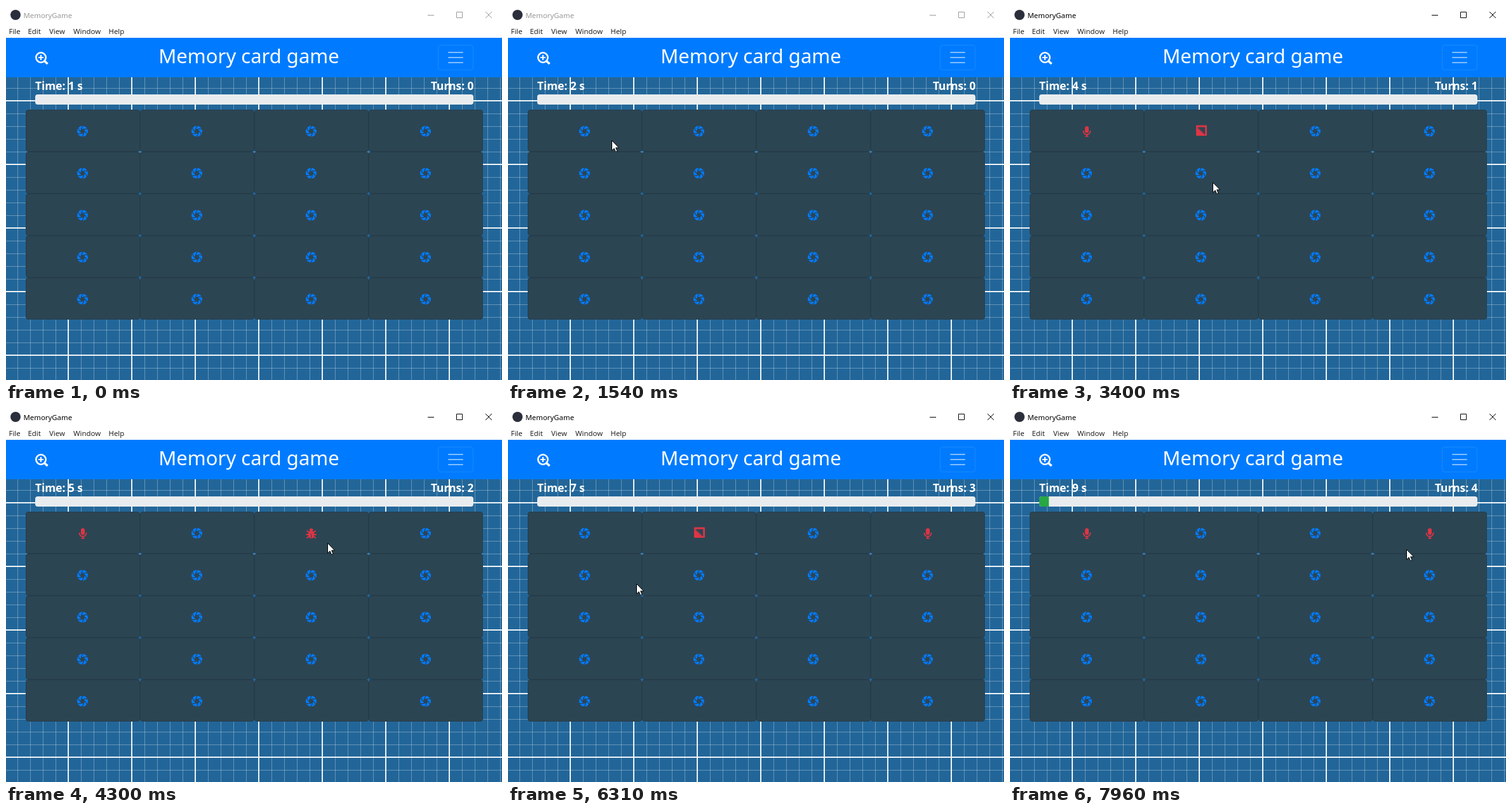
These frames come from a looping animation (781 px wide and 588 px high, 7.99 s). An HTML page:

```html
<!DOCTYPE html>
<html lang="en">
<head>
<meta charset="utf-8">
<title>Memory card game</title>
<style>
  html, body { margin: 0; width: 100%; height: 100%; overflow: hidden; }
  svg { display: block; width: 781px; height: 588px; }
  text { font-family: "Noto Sans", "Open Sans", sans-serif; white-space: pre; }
  .small { font-size: 11.4px; }
  .menu { fill: #222; }
  .title { font-size: 31px; font-weight: 500; fill: #fff; text-anchor: middle; }
  .status { font-size: 17.3px; font-weight: 700; fill: #fff; }
  .card { fill: #2c4553; stroke: #263d49; }
  .front { fill: #dc3545; stroke: none; }
  .hidden { display: none; }
  #chrome { color: #999; }
  #chrome.active { color: #000; }
</style>
</head>
<body>
<svg viewBox="0 0 781 588">
  <defs>
    <pattern id="minor" width="20" height="20" patternUnits="userSpaceOnUse" x="-2" y="49">
      <path d="M0 .5H20M.5 0V20" stroke="#fff" stroke-opacity=".3"/>
    </pattern>
    <pattern id="major" width="100" height="100" patternUnits="userSpaceOnUse" x="-3" y="48">
      <path d="M0 1H100M1 0V100" stroke="#fff" stroke-width="2" stroke-opacity=".9"/>
    </pattern>
    <clipPath id="barShape"><rect x="46" y="139" width="690" height="16" rx="4"/></clipPath>

    <g id="aperture">
      <circle r="8.5" fill="#007bff"/>
      <g id="blades" fill="none" stroke="#2c4553" stroke-width="1.3"></g>
    </g>
    <g id="mic">
      <rect x="-2.5" y="-8" width="6" height="10.5" rx="3"/>
      <path d="M-5 -1C-5 7 6 7 6 -1M.5 5V8.5" fill="none" stroke="#dc3545" stroke-width="1.9"/>
      <path d="M-2 7H3V8.6H-2Z"/>
    </g>
    <g id="picture">
      <rect x="-7.5" y="-9.5" width="17" height="16.5" rx="1"/>
      <path d="M-4 -6.5H6.7V3.8Z" fill="#2c4553"/>
      <path d="M-5 -6L6.5 4.5" stroke="#2c4553" stroke-width="1.2"/>
    </g>
    <g id="bug">
      <path d="M-3 -5.5A3.4 3.4 0 0 1 3.4 -5.5L2.5 -4H-2.1Z"/>
      <ellipse cx=".2" cy="2" rx="4.8" ry="6.3"/>
      <path d="M-7 -4L-3 -1.5M7.4 -4L3.4 -1.5M-8 2H8.4M-7 7.5L-3 4.5M7.4 7.5L3.4 4.5" stroke="#dc3545" stroke-width="2"/>
      <path d="M.2 1V8.5" stroke="#2c4553"/>
    </g>
  </defs>

  <rect width="781" height="50" fill="#fff"/>
  <circle cx="15" cy="14" r="8" fill="#2b2e3b"/>
  <g id="chrome">
    <text class="small" x="27.5" y="19" fill="currentColor">MemoryGame</text>
    <path d="M664 14.5H674M709.5 9.5H718.5V18.5H709.5ZM755 9L765 19M765 9L755 19" fill="none" stroke="currentColor"/>
  </g>
  <g class="small menu">
    <text x="4.5" y="44">File</text><text x="34.5" y="44">Edit</text>
    <text x="68" y="44">View</text><text x="106" y="44">Window</text>
    <text x="161.5" y="44">Help</text>
  </g>

  <rect y="50" width="781" height="538" fill="#226699"/>
  <rect y="50" width="781" height="538" fill="url(#minor)"/>
  <rect y="50" width="781" height="538" fill="url(#major)"/>
  <rect y="50" width="781" height="62" fill="#007bff"/>

  <g fill="none" stroke="#fff">
    <circle cx="55" cy="81" r="7.7" stroke-width="2.6"/>
    <path d="M55 77V85M51 81H59" stroke-width="2"/>
    <path d="M60.5 86.5L65.5 91" stroke-width="3.6"/>
    <rect x="680.5" y="61.5" width="55" height="39" rx="4" stroke-opacity=".1"/>
    <path d="M697 73H719M697 81H719M697 89H719" stroke-width="2" stroke-opacity=".5" stroke-linecap="round"/>
  </g>
  <text class="title" x="382.5" y="90">Memory card game</text>

  <text class="status" id="time" x="46" y="132"></text>
  <text class="status" id="turns" x="736.5" y="132" text-anchor="end"></text>
  <g clip-path="url(#barShape)">
    <rect x="46" y="139" width="690" height="16" fill="#e9ecef"/>
    <rect id="bar" x="46" y="139" width="0" height="16" fill="#28a745"/>
  </g>
  <g id="cards"></g>
  <path id="cursor" d="M.5 .5V16.2L4.1 12.8L6.6 18.4L9.1 17.3L6.7 11.9H11.6Z" fill="#fff" stroke="#000"/>
</svg>
<script>
const LOOP = 7990;
const $ = id => document.getElementById(id);

// [ms, x, y] of the pointer tip
const path = [
  [320, 732, 586], [910, 640, 493], [1060, 640, 493], [1540, 163, 211],
  [1770, 155, 212], [2120, 155, 212], [2560, 313, 212], [2660, 314, 213],
  [2890, 324, 273], [3010, 324, 273], [3400, 319, 277], [3440, 318, 276],
  [3720, 154, 211], [3830, 154, 211], [4300, 506, 212], [4610, 560, 263],
  [4720, 560, 263], [5380, 602, 215], [5520, 600, 216], [5660, 578, 234],
  [6070, 318, 222], [6130, 306, 225], [6310, 202, 276], [6450, 200, 279],
  [6670, 200, 279], [6900, 197, 283], [7330, 156, 212], [7490, 156, 212],
  [7840, 618, 215], [7960, 624, 222]
];

// [card, picture, shown from, shown until]
const reveals = [
  [0, "mic", 1740, 3500], [1, "picture", 2600, 3500],
  [0, "mic", 3750, 5170], [2, "bug", 4270, 5170],
  [3, "mic", 5430, 7030], [1, "picture", 6120, 7030],
  [0, "mic", 7400, LOOP], [3, "mic", 7860, LOOP]
];
const turnTimes = [2600, 4270, 6120, 7860];
const FOCUS = 1740, MATCH = 7860;

function hexagon() {
  const point = k => [4.2 * Math.cos(k * Math.PI / 3), 4.2 * Math.sin(k * Math.PI / 3)];
  let hole = "", cuts = "";
  for (let k = 0; k < 6; k++) {
    const [x, y] = point(k), [px, py] = point(k - 1);
    hole += `${k ? "L" : "M"}${x} ${y}`;
    cuts += `M${x} ${y}l${(x - px) * 1.6} ${(y - py) * 1.6}`;
  }
  return `<path d="${hole}Z" fill="#2c4553" stroke="none"/><path d="${cuts}"/>`;
}
$("blades").innerHTML = hexagon();

const iconAt = (name, i, extra = "") =>
  `<use href="#${name}" x="${120.5 + i % 4 * 180}" y="${197 + Math.floor(i / 4) * 66}" ${extra}/>`;

$("cards").innerHTML = Array.from({ length: 20 }, (_, i) => `
  <rect class="card" x="${31.5 + i % 4 * 180}" y="${163.5 + Math.floor(i / 4) * 66}" width="179" height="65" rx="3.5"/>
  ${iconAt("aperture", i, `id="back${i}"`)}`).join("") +
  reveals.map(([card, name], k) => iconAt(name, card, `id="front${k}" class="front"`)).join("");

function pointer(t) {
  let k = path.findIndex(p => p[0] > t);
  if (k < 0) return path[path.length - 1].slice(1);
  const [t0, x0, y0] = path[k - 1], [t1, x1, y1] = path[k];
  const u = (t - t0) / (t1 - t0), e = u * u * (3 - 2 * u);
  return [x0 + (x1 - x0) * e, y0 + (y1 - y0) * e];
}

// CSS "ease" curve
function ease(x) {
  let lo = 0, hi = 1, s = 0;
  for (let i = 0; i < 20; i++) {
    s = (lo + hi) / 2;
    const bx = 3 * (1 - s) ** 2 * s * .25 + 3 * (1 - s) * s * s * .25 + s ** 3;
    if (bx < x) lo = s; else hi = s;
  }
  return 3 * (1 - s) ** 2 * s * .1 + 3 * (1 - s) * s * s + s ** 3;
}

function setText(id, value) {
  if ($(id).textContent !== value) $(id).textContent = value;
}

function draw(t) {
  setText("time", `Time: ${1 + Math.floor((t + 120) / 1000)} s`);
  setText("turns", `Turns: ${turnTimes.filter(s => t >= s).length}`);
  $("chrome").classList.toggle("active", t >= FOCUS);

  const open = new Set();
  reveals.forEach(([card, , from, to], k) => {
    const shown = t >= from && t < to;
    if (shown) open.add(card);
    $("front" + k).classList.toggle("hidden", !shown);
  });
  for (let i = 0; i < 4; i++) $("back" + i).classList.toggle("hidden", open.has(i));

  const grown = Math.min(Math.max(t - MATCH, 0), 100) / 600;
  $("bar").setAttribute("width", grown ? 69 * ease(grown) : 0);

  const visible = t >= path[0][0];
  $("cursor").classList.toggle("hidden", !visible);
  if (visible) $("cursor").setAttribute("transform", `translate(${pointer(t).map(Math.round)})`);
}

const start = performance.now();
function frame() {
  draw((performance.now() - start) % LOOP);
  requestAnimationFrame(frame);
}
draw(0);
requestAnimationFrame(frame);
</script>
</body>
</html>
```
